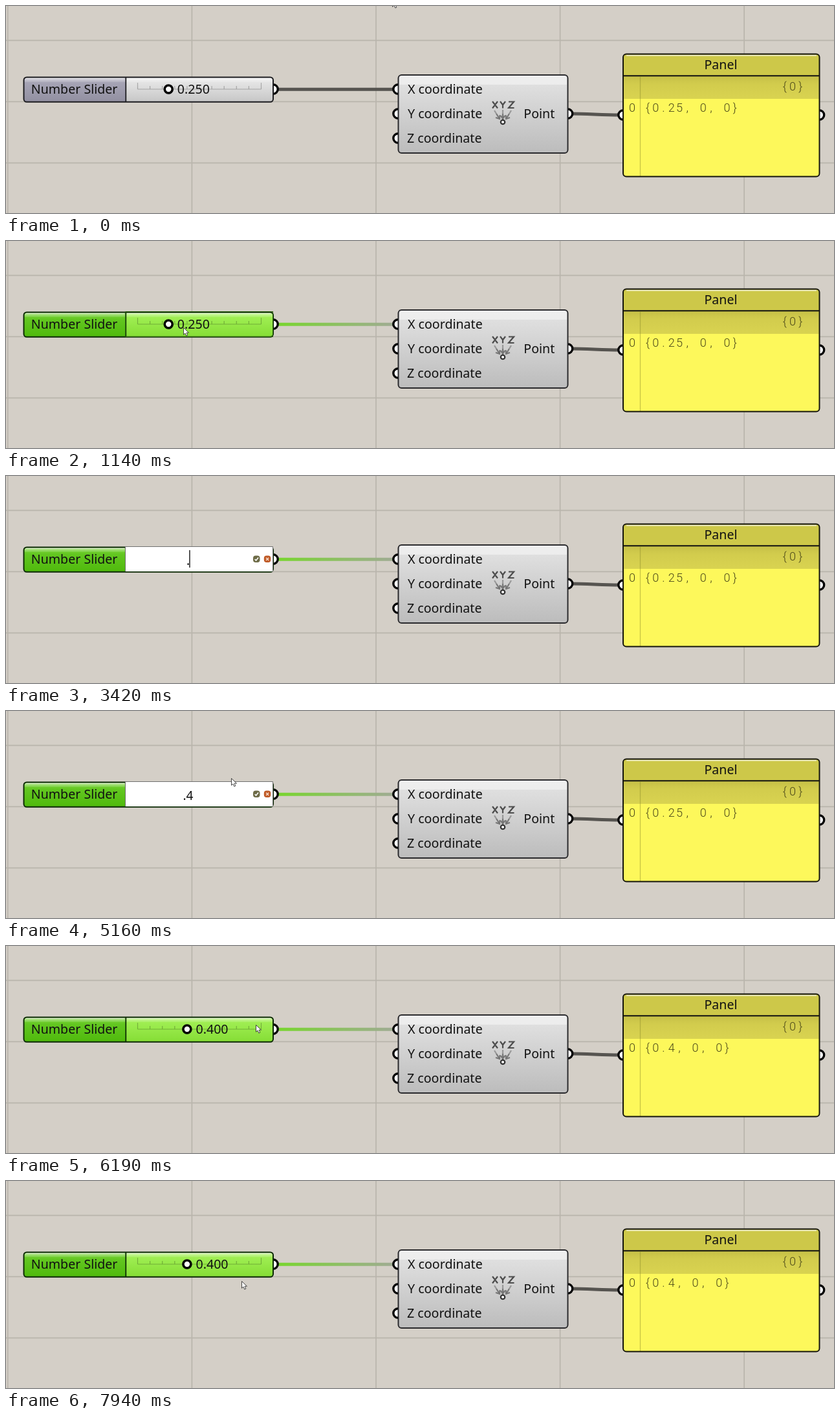
Animation, 1280 px wide and 321 px high, one loop 8 s. Source, as an HTML page:

```html
<!DOCTYPE html>
<html lang="en">
<head>
<meta charset="utf-8">
<title>Number slider</title>
<style>
  html, body { margin: 0; width: 100%; height: 100%; overflow: hidden; background: #d4cfc7; }
  svg { display: block; width: 1280px; height: 321px; }
  text { font: 19.6px "Noto Sans", "Open Sans", sans-serif; fill: #111; white-space: pre; }
  .mono { font: 300 18.2px Roboto, Inter, sans-serif; fill: #4e4b1a; text-anchor: middle; }
  #typed { font-size: 19px; }
  .grip circle { fill: #fff; stroke: #000; stroke-width: 3.4; }
</style>
</head>
<body>
<svg viewBox="0 0 1280 321">
  <defs>
    <linearGradient id="nameGrey" x2="0" y2="1">
      <stop stop-color="#b3b1c0"/><stop offset=".25" stop-color="#a5a3b4"/><stop offset="1" stop-color="#918fa0"/>
    </linearGradient>
    <linearGradient id="nameGreen" x2="0" y2="1">
      <stop stop-color="#7bd43a"/><stop offset=".3" stop-color="#62c620"/><stop offset="1" stop-color="#4fb90c"/>
    </linearGradient>
    <linearGradient id="trackGrey" x2="0" y2="1">
      <stop stop-color="#ececec"/><stop offset="1" stop-color="#c6c6c6"/>
    </linearGradient>
    <linearGradient id="trackGreen" x2="0" y2="1">
      <stop stop-color="#a6f25a"/><stop offset="1" stop-color="#85dd35"/>
    </linearGradient>
    <linearGradient id="shine" x2="0" y2="1">
      <stop stop-color="#fff" stop-opacity=".55"/><stop offset="1" stop-color="#fff" stop-opacity=".1"/>
    </linearGradient>
    <linearGradient id="node" x2="0" y2="1">
      <stop stop-color="#e4e4e4"/><stop offset="1" stop-color="#bcbcbc"/>
    </linearGradient>
    <linearGradient id="path" x2="0" y2="1">
      <stop stop-color="#c6c047"/><stop offset=".35" stop-color="#d2cc4d"/><stop offset="1" stop-color="#d9d350"/>
    </linearGradient>
    <linearGradient id="wireGreen" gradientUnits="userSpaceOnUse" x1="421" x2="600">
      <stop stop-color="#78d52f"/><stop offset="1" stop-color="#a0ab94"/>
    </linearGradient>
  </defs>
  <rect width="1280" height="321" fill="#d4cfc7"/>
  <path id="grid" stroke="#b9b5ac" stroke-width="1.7"/>

  <path id="wire" d="M420 129.200H600" stroke-width="5"/>
  <path d="M874 167C898 167 922 169 948 169" fill="none" stroke="#565450" stroke-width="5"/>
  <g class="grip">
    <circle cx="413" cy="129" r="7.200"/>
    <circle cx="606" cy="129" r="7.200"/><circle cx="606" cy="167" r="7.200"/><circle cx="606" cy="205" r="7.200"/>
    <circle cx="868.500" cy="167" r="7.200"/>
    <circle cx="954" cy="169" r="7.200"/><circle cx="1257.500" cy="169" r="7.200"/>
  </g>

  <rect id="track" x="27.500" y="110.500" width="385.500" height="38.300" rx="4.500"/>
  <path id="name" d="M185 110.500H32a4.500 4.500 0 0 0-4.500 4.500v29.300a4.500 4.500 0 0 0 4.500 4.500H185Z"/>
  <path d="M28.500 118V115q0-4 4-4H408q4 0 4 4V118Z" fill="url(#shine)"/>
  <path d="M31 112.300H183M187 112.300H409" stroke="#fff" stroke-opacity=".5" stroke-width="1.600"/>
  <path id="divider" d="M185.300 110V149" stroke-width="1.800"/>
  <rect id="rim" x="27.500" y="110.500" width="385.500" height="38.300" rx="4.500" fill="none" stroke-width="2"/>
  <text x="38.800" y="136">Number Slider</text>
  <path id="ruler" fill="none" stroke="#000" stroke-opacity=".25" stroke-width="1.200"/>
  <circle id="knob" cy="129" r="6" fill="#fff" stroke="#000" stroke-width="3.600"/>
  <text id="value" y="136"></text>
  <rect id="focus" x="185" y="109.500" width="227.500" height="39" fill="none" stroke="#2d6310"/>

  <g id="editor">
    <rect x="184.500" y="109.500" width="228" height="38.500" fill="#fff"/>
    <path d="M184.500 148V109.500H412.500V148" fill="none" stroke="#6f6f6f"/>
    <rect id="mark" x="257" y="115" width="49" height="27" fill="#0078d7"/>
    <text id="typed" x="281.500" y="137.500" text-anchor="middle"></text>
    <rect id="caret" y="115" width="1.300" height="27"/>
    <path id="beam" d="M272.500 129.500H276.500M274.500 129.500V140.500M272.500 140.500H276.500" fill="none" stroke="#d9a07a"/>
    <rect x="382" y="123.500" width="10.500" height="10.500" rx="4" fill="#6d6b47"/>
    <path d="M384.700 129l1.800 2 3.600-4.500" fill="none" stroke="#fff" stroke-width="1.500"/>
    <rect x="398.800" y="123.500" width="10.500" height="10.500" rx="4" fill="#bf5a26"/>
    <path d="M402 126.700l4.200 4.200m0-4.200l-4.200 4.200" stroke="#f6dccb" stroke-width="1.400"/>
  </g>

  <rect x="606.500" y="107" width="262" height="121" rx="5" fill="url(#node)"/>
  <path d="M608 122V110.500q0-2 3-2H864q3 0 3 2V122Z" fill="#fff" fill-opacity=".4"/>
  <path d="M611 109H864" stroke="#fff" stroke-width="1.600"/>
  <rect x="606.500" y="107" width="262" height="121" rx="5" fill="none" stroke="#2a2a2d" stroke-width="2"/>
  <text x="621" y="136">X coordinate</text>
  <text x="621" y="174">Y coordinate</text>
  <text x="620" y="212">Z coordinate</text>
  <text x="800.300" y="174">Point</text>
  <g fill="none" stroke="#4d4d4d" stroke-width="2.200">
    <path d="M752 148l8 10.500m0-10.500l-8 10.500M764 148l4 5.500 4-5.500M768 153.500v5M777 148.500h8l-8 9.500h8.500"/>
    <path d="M755 162l3 5M768 161v6M781 162l-3 5" stroke="#999"/>
    <path d="M758 167l5 8m-6-2l6 2 .5-6M768 167v7m-3-4l3 5 3-5M778 167l-5 8m6-2l-6 2-.5-6" stroke="#777"/>
    <circle cx="768" cy="180" r="3.200" fill="#fff" stroke="#333"/>
  </g>

  <rect x="954" y="74.500" width="303.500" height="190" rx="5" fill="#fdf85b"/>
  <path d="M954 108V79.500q0-5 5-5H1252.500q5 0 5 5V108Z" fill="#cdc849"/>
  <path d="M959 76.600H1253" stroke="#fff" stroke-opacity=".75" stroke-width="1.600"/>
  <rect x="955" y="109" width="301.500" height="35" fill="url(#path)"/>
  <path d="M954 108.300H1257.500" stroke="#111" stroke-width="2"/>
  <path d="M980.500 109.500V264" stroke="#8b872c" stroke-opacity=".45" stroke-width="1.300"/>
  <rect x="954" y="74.500" width="303.500" height="190" rx="5" fill="none" stroke="#15150c" stroke-width="2"/>
  <text x="1105" y="98" text-anchor="middle">Panel</text>
  <text class="mono" id="branch" y="130.500"></text>
  <text class="mono" id="index" y="164"></text>
  <text class="mono" id="result" y="164"></text>

  <path id="arrow" d="M.5.500V11.200L3 9l1.800 4 2-.9L5 8.200H8.500Z" fill="#fff" stroke="#333" stroke-width=".9"/>
</svg>
<script>
const LOOP = 8000;
const PITCH = 12.25;
const $ = id => document.getElementById(id);
const set = (id, attrs) => { for (const k in attrs) $(id).setAttribute(k, attrs[k]); };
const show = (id, on) => $(id).style.display = on ? '' : 'none';
const put = (id, s) => { if ($(id).textContent !== s) $(id).textContent = s; };
// Fixed-pitch text: each character is centred in its own cell
const cells = (id, x, s) => {
  put(id, s);
  set(id, { x: [...s].map((c, i) => x + PITCH * i).join(' ') });
};

let grid = '';
for (let i = 0; i < 5; i++) grid += `M${2.8 + 284.6 * i} 0V321`;
for (let i = 0; i < 3; i++) grid += `M0 ${53.3 + 95 * i}H1280`;
set('grid', { d: grid });

let ruler = 'M203.500 129H394.500';
for (let i = 0; i <= 10; i++) ruler += `M${203.5 + 19.1 * i} 129v${i % 10 ? -5 : -10}`;
set('ruler', { d: ruler });

cells('branch', 1203.7, '{0}');
cells('index', 968, '0');

// Pointer runs: start, end, number of steps, stops on the way
const home = [597, -10];
const runs = [
  [250, 730, 7, [home, [480, 44], [345, 112], [274, 134]]],
  [5010, 5710, 11, [[290, 124], [306, 112], [330, 92], [348, 104], [366, 124], [378, 135], [384, 130], [386, 117]]],
  [5850, 5920, 2, [[386, 117], [386, 122]]],
  [6260, 6740, 8, [[386, 122], [396, 156], [409, 203], [413, 215]]],
  [7670, 7940, 5, [[413, 215], [401, 196], [372, 163], [364, 155]]]
];
// The second run passes through its first stops one step at a time
const pace = (n, k, stops) => n === 11 ? (k <= 3 ? k : 3 + (k - 3) / 2) : k / n * (stops - 1);

function pointer(t) {
  let pos = home;
  for (const [from, to, n, pts] of runs) {
    if (t < from) break;
    const k = Math.min(n, Math.floor((t - from) / (to - from) * (n - 1) + 1e-6) + 1);
    const s = pace(n, k, pts.length);
    const i = Math.min(pts.length - 2, Math.floor(s));
    const f = s - i;
    pos = [0, 1].map(a => pts[i][a] + (pts[i + 1][a] - pts[i][a]) * f);
  }
  return pos;
}

function draw(t) {
  const green = t >= 930;
  const tint = green ? 'Green' : 'Grey';
  const edge = green ? '#0c2a04' : '#1d1d20';
  set('track', { fill: `url(#track${tint})` });
  set('name', { fill: `url(#name${tint})` });
  set('wire', { stroke: green ? 'url(#wireGreen)' : '#565450' });
  set('rim', { stroke: edge });
  set('divider', { stroke: edge });

  const v = t < 6120 ? 0.25 : 0.4;
  const x = 203.5 + 191 * v;
  set('knob', { cx: x });
  set('value', { x: x + 13.6 });
  put('value', v.toFixed(3));
  cells('result', 992, `{${v}, 0, 0}`);
  show('focus', t >= 1070 && t < 1210);

  const editing = t >= 1210 && t < 6120;
  const marked = t < 2340;
  show('editor', editing);
  show('mark', marked);
  show('beam', t >= 1480 && marked);
  put('typed', marked ? '0.250' : t < 4220 ? '.' : '.4');
  set('typed', { fill: marked ? '#fff' : '#111' });
  const key = marked ? 1210 : t < 4220 ? 2340 : 4220;
  set('caret', {
    x: marked ? 304.9 : t < 4220 ? 283.3 : 289.3,
    fill: marked ? '#ff8728' : '#000'
  });
  show('caret', Math.floor((t - key) / 530) % 2 === 0);

  const [px, py] = pointer(t);
  set('arrow', { transform: `translate(${px.toFixed(1)} ${py.toFixed(1)})` });
  show('arrow', t < 1210 || t >= 5010);
}

const start = performance.now();
function tick() {
  draw((performance.now() - start) % LOOP);
  requestAnimationFrame(tick);
}
draw(0);
requestAnimationFrame(tick);
</script>
</body>
</html>
```
